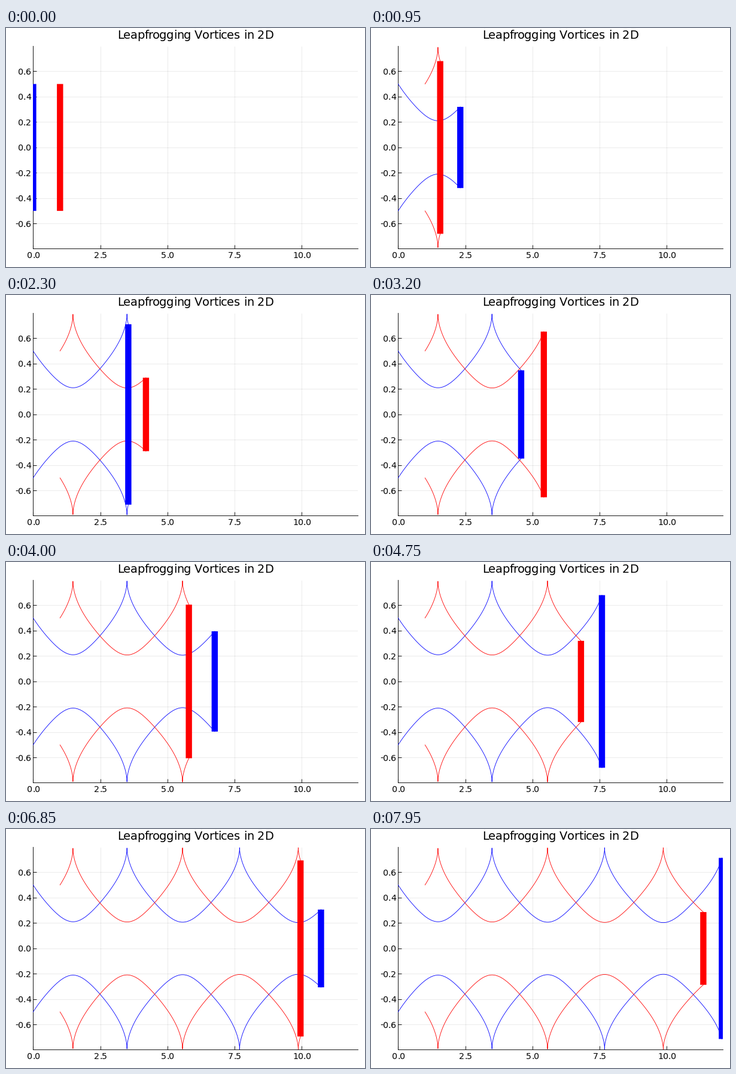
These frames come from a looping animation (600x400 px, 8000 ms). A matplotlib script:

```python
import matplotlib.pyplot as plt
import numpy as np
from matplotlib.animation import FuncAnimation
from matplotlib.textpath import TextPath

W, H, DPI = 600, 400, 100
PX = 72 / DPI
FRAMES, STEPS, DT = 160, 25, 0.01
LEFT, RIGHT, TOP, BOTTOM = 45.4, 588, 30.5, 369.3
X_MAX, Y_MAX = 12.087, 0.7975
TITLE_SIZE, TICK_SIZE = 19.55, 14.2


def simulate():
    """Euler steps for two vortex pairs mirrored about y = 0."""
    pos = np.empty((FRAMES * STEPS + 1, 2), complex)
    blue, red = 0.5j, 1 + 0.5j
    k = 1 / (2j * np.pi)

    def speed(z, other):
        w = k * (1 / (z - other) - 1 / (z - other.conjugate())
                 - 1 / (z - z.conjugate()))
        return w.conjugate()

    for i in range(len(pos)):
        pos[i] = blue, red
        blue, red = blue + DT * speed(blue, red), red + DT * speed(red, blue)
    return pos


def advance(char, size):
    """Glyph advance in whole pixels."""
    font = {"family": "DejaVu Sans"}
    ends = [TextPath((0, 0), s, size=size, prop=font).get_extents().x1
            for s in (char + "|", "|")]
    return int(ends[0] - ends[1])


def label(text, x, base, size, align):
    steps = [advance(c, size) for c in text]
    pen = int(x - align * sum(steps) + 0.5)
    for char, step in zip(text, steps):
        if char != " ":
            fig.text(pen / W, 1 - base / H, char, fontsize=size * PX,
                     ha="left", va="baseline")
        pen += step


plt.rcParams["font.family"] = "DejaVu Sans"
plt.rcParams["path.simplify"] = False
fig = plt.figure(figsize=(W / DPI, H / DPI), dpi=DPI, facecolor="white")
ax = fig.add_axes([LEFT / W, 1 - BOTTOM / H,
                   (RIGHT - LEFT) / W, (BOTTOM - TOP) / H])
ax.set(xlim=(0, X_MAX), ylim=(-Y_MAX, Y_MAX))
xticks = np.arange(0, 12, 2.5)
yticks = np.arange(-3, 4) / 5
ax.set_xticks(xticks)
ax.set_yticks(yticks)
ax.tick_params(direction="in", length=6 * PX, width=0.9 * PX,
               labelbottom=False, labelleft=False)
ax.grid(color="black", alpha=0.1, linewidth=0.75 * PX)
ax.set_axisbelow(True)
for side in ("top", "right"):
    ax.spines[side].set_visible(False)
for side in ("left", "bottom"):
    ax.spines[side].set_linewidth(0.9 * PX)

label("Leapfrogging Vortices in 2D", (LEFT + RIGHT) / 2, 18, TITLE_SIZE, 0.5)
for v in xticks:
    label(f"{v:.1f}", LEFT + v / X_MAX * (RIGHT - LEFT) + 0.1, 385,
          TICK_SIZE, 0.5)
for v in yticks:
    y = (TOP + BOTTOM) / 2 - v / Y_MAX * (BOTTOM - TOP) / 2
    label(f"{v:.1f}", 42, round(y + 5.2), TICK_SIZE, 1)

path = simulate()
COLORS = ("#0000ff", "#ff0000")
trails = [[ax.plot([], [], color=c, lw=0.85 * PX, zorder=3)[0]
           for _ in range(2)] for c in COLORS]
bars = [ax.plot([], [], color=c, lw=10.4 * PX, zorder=4, snap=False,
                solid_capstyle="butt")[0] for c in COLORS]


def draw(frame):
    last = frame * STEPS
    for i, (pair, bar) in enumerate(zip(trails, bars)):
        z = path[:last + 1, i]
        for line, sign in zip(pair, (1, -1)):
            line.set_data(z.real, sign * z.imag)
        x, y = z[-1].real, z[-1].imag
        bar.set_data([x, x], [-y, y])
    return [*trails[0], *trails[1], *bars]


anim = FuncAnimation(fig, draw, frames=FRAMES, interval=50,
                     repeat=True, repeat_delay=0)
plt.show()
```
